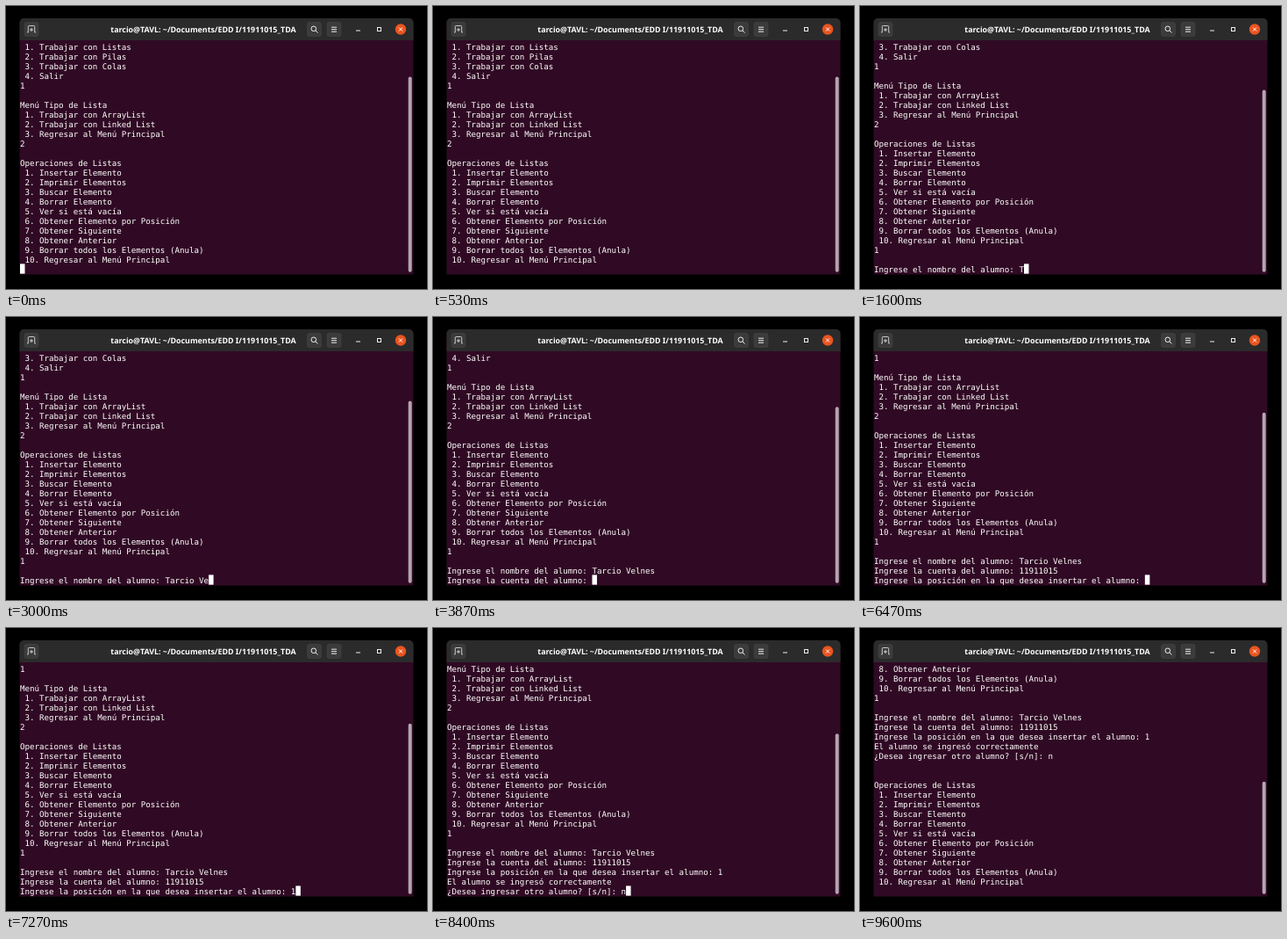
An HTML page for the animation above (9990 ms loop, 480 by 322 pixels).

```html
<!DOCTYPE html>
<html lang="es">
<head>
<meta charset="utf-8">
<title>Terminal</title>
<style>
  html, body { margin: 0; width: 100%; height: 100%; overflow: hidden; background: #000; }
  svg, pre { position: absolute; }
  svg { left: 0; top: 0; }
  text { font: bold 8.85px "Noto Sans", sans-serif; fill: #fff; text-rendering: geometricPrecision; }
  pre {
    left: 16px; top: 42px; margin: 0; color: #fff;
    font: 9.16px/11px "DejaVu Sans Mono", monospace;
    text-rendering: geometricPrecision;
    font-variant-ligatures: none;
  }
</style>
</head>
<body>
<svg width="480" height="322" viewBox="0 0 480 322">
  <path d="M15.5 305.5V19a5 5 0 0 1 5-5H459.5a5 5 0 0 1 5 5V305.5z" fill="#300a24"/>
  <path d="M15.5 39V19a5 5 0 0 1 5-5H459.5a5 5 0 0 1 5 5V39z" fill="#2b2b2b"/>
  <g fill="#3b3b3b" stroke="#464646" stroke-width=".6">
    <rect x="21" y="18.5" width="16" height="16" rx="2.5"/>
    <rect x="343.5" y="18.5" width="16" height="16" rx="2.5"/>
    <rect x="366" y="18.5" width="16" height="16" rx="2.5"/>
  </g>
  <g fill="none" stroke="#eee">
    <path d="M24 30H25.3V23.5a1 1 0 0 1 1-1H31.7a1 1 0 0 1 1 1V30H34M29 25v4M27 27h4" stroke-width=".8"/>
    <circle cx="350.8" cy="25.8" r="2.8"/>
    <path d="M353 28l2.5 2.5M371 24.2h6M371 26.7h6M371 29.2h6"/>
    <path d="M399 28h5"/>
    <rect x="423.5" y="24.5" width="4" height="4"/>
  </g>
  <circle cx="450" cy="26.5" r="6.2" fill="#e95420"/>
  <path d="M448 24.5l4 4m0-4l-4 4" stroke="#fff" fill="none"/>
  <text x="225" y="29.7" text-anchor="middle">tarcio@TAVL: ~/Documents/EDD I/11911015_TDA</text>
  <rect id="cursor" y="293.4" width="5.5" height="11.2" fill="#fff"/>
  <rect id="thumb" x="458.7" width="4" rx="2" fill="#b3a7af"/>
</svg>
<pre id="screen"></pre>
<script>
const LOOP = 9990, ROWS = 24, COLUMN = 5.515;
const SCROLLED_OFF = 4, TRACK = 264, THUMB_BOTTOM = 302.7;

const listMenu = `Operaciones de Listas
 1. Insertar Elemento
 2. Imprimir Elementos
 3. Buscar Elemento
 4. Borrar Elemento
 5. Ver si está vacía
 6. Obtener Elemento por Posición
 7. Obtener Siguiente
 8. Obtener Anterior
 9. Borrar todos los Elementos (Anula)
 10. Regresar al Menú Principal
`;

const opening = ` 1. Trabajar con Listas
 2. Trabajar con Pilas
 3. Trabajar con Colas
 4. Salir
1

Menú Tipo de Lista
 1. Trabajar con ArrayList
 2. Trabajar con Linked List
 3. Regresar al Menú Principal
2

${listMenu}`;

const typed = (text, times) => times.map((time, i) => [time, text[i]]);

// [time in ms, text appended to the terminal]
const output = [
  [0, opening],
  [870, '1'],
  [1000, '\n\nIngrese el nombre del alumno: '],
  ...typed('Tarcio Velnes', [1600, 1800, 1930, 2130, 2270, 2330, 2530, 2870, 3000, 3130, 3270, 3400, 3530]),
  [3870, '\nIngrese la cuenta del alumno: '],
  ...typed('11911015', [4600, 4730, 4870, 5000, 5130, 5270, 5730, 5930]),
  [6470, '\nIngrese la posición en la que desea insertar el alumno: '],
  [7270, '1'],
  [7600, '\nEl alumno se ingresó correctamente\n¿Desea ingresar otro alumno? [s/n]: '],
  [8400, 'n'],
  [9000, '\n\n\n' + listMenu],
];

// Spans in which the blinking cursor is dark
const cursorOff = [[530, 870], [4470, 4600], [7130, 7270], [8130, 8400], [9600, LOOP]];

const [screenEl, cursorEl, thumbEl] =
  ['screen', 'cursor', 'thumb'].map(id => document.getElementById(id));
const start = performance.now();

function draw() {
  const time = Math.max(0, performance.now() - start) % LOOP;
  const lines = output.filter(([at]) => at <= time).map(([, text]) => text).join('').split('\n');
  const visible = lines.slice(-ROWS).join('\n');
  if (screenEl.textContent !== visible) screenEl.textContent = visible;

  const dark = cursorOff.some(([from, to]) => time >= from && time < to);
  cursorEl.setAttribute('x', 16 + lines.at(-1).length * COLUMN);
  cursorEl.setAttribute('opacity', dark ? 0 : 1);

  const thumbHeight = TRACK * ROWS / (lines.length + SCROLLED_OFF) - 4;
  thumbEl.setAttribute('y', THUMB_BOTTOM - thumbHeight);
  thumbEl.setAttribute('height', thumbHeight);
  requestAnimationFrame(draw);
}
draw();
</script>
</body>
</html>
```
